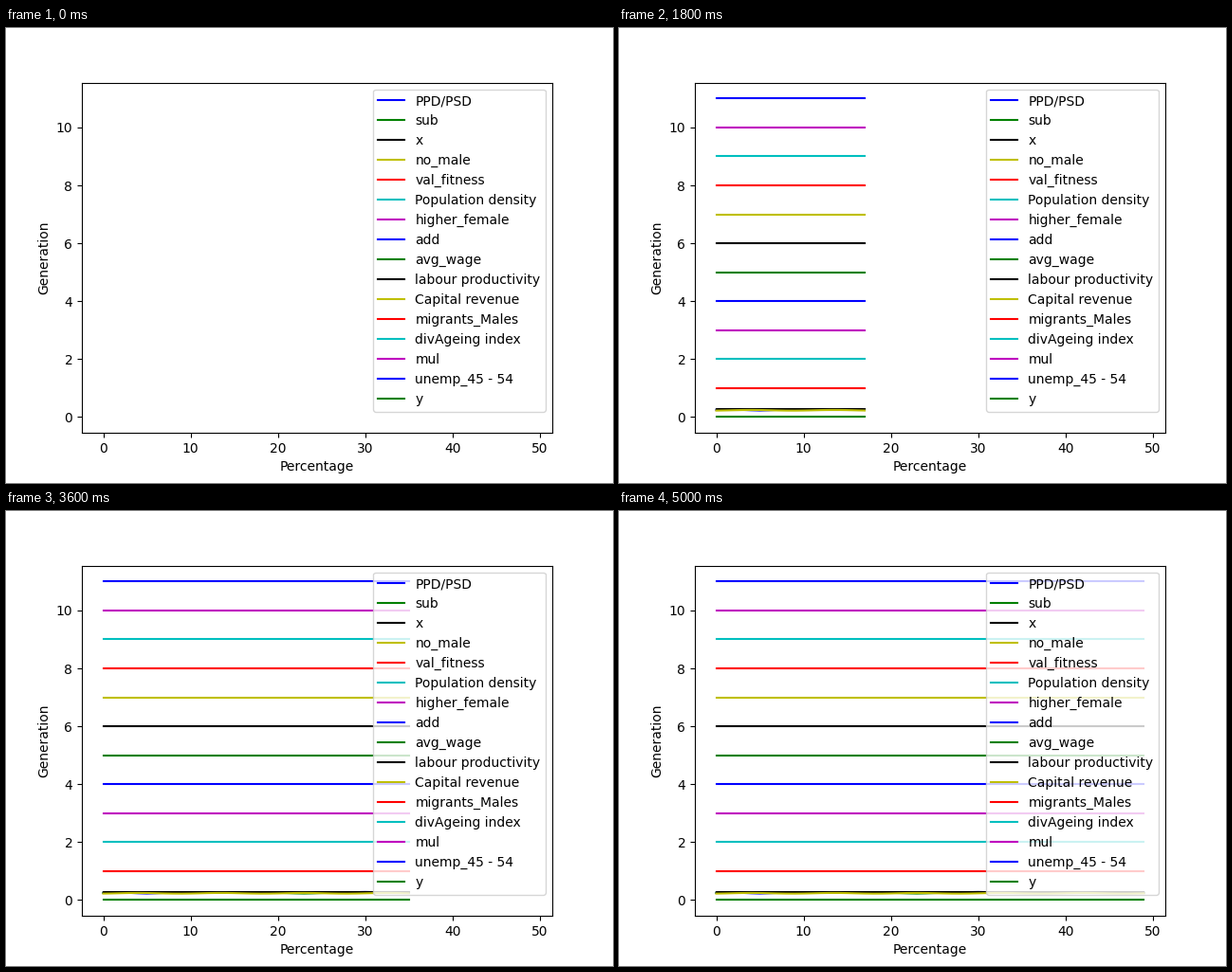
Animation of 640x480 px, one loop 10 s. Source, as a matplotlib script:

```python
import numpy as np
import matplotlib.pyplot as plt
from matplotlib.animation import FuncAnimation

LABELS = ["PPD/PSD", "sub", "x", "no_male", "val_fitness",
          "Population density", "higher_female", "add", "avg_wage",
          "labour productivity", "Capital revenue", "migrants_Males",
          "divAgeing index", "mul", "unemp_45 - 54", "y"]
COLORS = "bgkyrcm"
STEPS = 50
FRAMES = 100

plt.rcParams["font.family"] = "DejaVu Sans"
x = np.arange(STEPS)


def bump(center, width):
    return np.exp(-((x - center) / width) ** 2)


# Four shares wander around a quarter, the others stay at whole numbers
series = [
    0.25 + 0.028 * bump(30, 2) - 0.025 * bump(5, 1.5),
    0.25 - 0.025 * bump(23, 2) + 0.015 * bump(33, 2),
    np.full(STEPS, 0.26),
    0.233 + 0.012 * np.cos(2 * np.pi * (x - 4) / 9.5),
]
series += [np.full(STEPS, float(level)) for level in range(1, 12)]
series.append(np.zeros(STEPS))

fig, ax = plt.subplots(figsize=(6.4, 4.8), dpi=100)
ax.set_xlim(-2.45, 51.45)
ax.set_ylim(-0.55, 11.55)
ax.set_xlabel("Percentage")
ax.set_ylabel("Generation")
lines = [ax.plot([], [], COLORS[i % len(COLORS)], label=label)[0]
         for i, label in enumerate(LABELS)]
ax.legend(loc="upper right")


def update(frame):
    n = min(frame, STEPS)
    for line, values in zip(lines, series):
        line.set_data(x[:n], values[:n])
    return lines


anim = FuncAnimation(fig, update, frames=FRAMES, interval=100,
                     init_func=lambda: update(0), repeat=True, repeat_delay=0)
plt.show()
```
